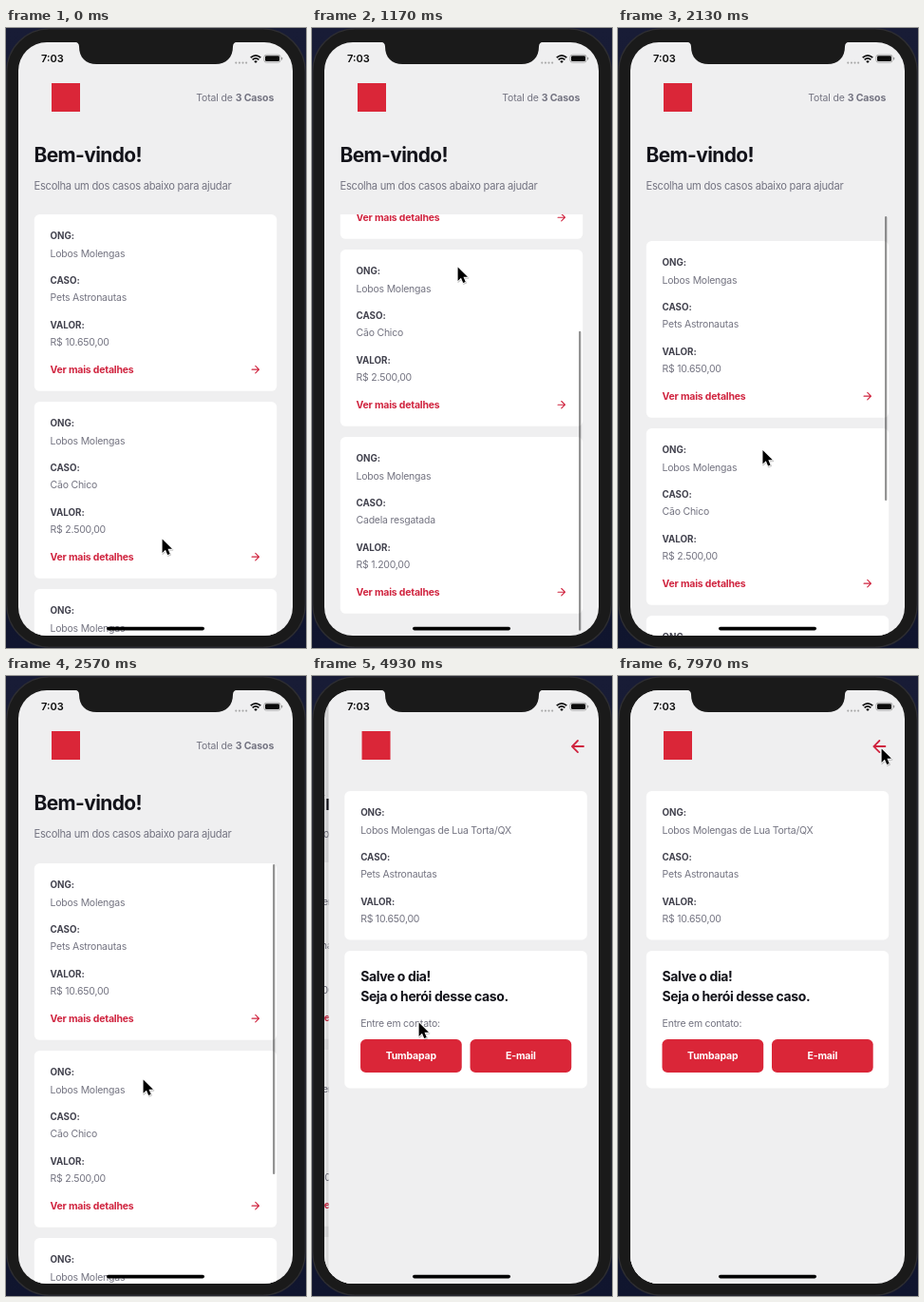
Write an HTML page that moves like this. It is 316 px wide and 652 px high and loops after 8 s.

```html
<!DOCTYPE html>
<html lang="pt-BR">
<head>
<meta charset="utf-8">
<title>Casos</title>
<style>
  html, body { margin: 0; width: 100%; height: 100%; overflow: hidden; background: #12162c; }
  svg { display: block; width: 100vw; height: 100vh; }
  text { font: 400 10.47px Inter, "Open Sans", sans-serif; letter-spacing: -.021em; fill: #737380; }
  .label { font-size: 9.77px; font-weight: 700; letter-spacing: -.004em; fill: #41414d; }
  .link { font-weight: 700; letter-spacing: -.019em; fill: #d0243f; }
  .title { font-size: 20.9px; font-weight: 700; letter-spacing: -.028em; fill: #13131a; }
  .hero { font-size: 13.96px; font-weight: 700; letter-spacing: -.026em; fill: #13131a; }
  .intro { font-size: 11.17px; letter-spacing: -.024em; }
  .button { font-weight: 700; letter-spacing: -.013em; fill: #fff; text-anchor: middle; }
  .clock { font-size: 11px; font-weight: 600; letter-spacing: 0; fill: #0b0b0b; }
  .total { letter-spacing: -.01em; text-anchor: end; }
  .bold { font-weight: 700; }
  .line { fill: none; stroke: #d0243f; stroke-width: 2.1; stroke-linecap: round; stroke-linejoin: round; }
</style>
</head>
<body>
<svg id="stage" viewBox="0 0 316 652"></svg>
<script>
const LOOP = 8000;
const SCREEN = { x: 13, y: 15, w: 289, h: 624 };
const LIST_TOP = 196, CARD_STEP = 197, MAX_SCROLL = 148;
const PUSH_START = 4596;
const RED = '#da2638', PAPER = '#efeff0', BODY = '#1a1a1a', INK = '#0b0b0b';

const ong = 'Lobos Molengas';
const cases = [
  ['Pets Astronautas', 'R$ 10.650,00'],
  ['Cão Chico', 'R$ 2.500,00'],
  ['Cadela resgatada', 'R$ 1.200,00'],
];

const text = (x, y, str, cls = '') => `<text x="${x}" y="${y}" class="${cls}">${str}</text>`;
const rect = (x, y, w, h, fill, r = 0, more = '') =>
  `<rect x="${x}" y="${y}" width="${w}" height="${h}" rx="${r}" fill="${fill}" ${more}/>`;
const card = (y, h) => rect(29.8, y, 255.4, h, '#fff', 5.6);
const logo = rect(48, 58, 30, 30, RED);

const fields = (y, values) => ['ONG:', 'CASO:', 'VALOR:'].map((name, i) =>
  text(46.6, y + 26.4 + i * 46.7, name, 'label') +
  text(46.6, y + 44.6 + i * 46.7, values[i])).join('');

const caseCard = ([name, value], i) => {
  const y = LIST_TOP + i * CARD_STEP;
  return card(y, 185.8) + fields(y, [ong, name, value]) +
    `<g id="link${i}">${text(46.6, y + 166.8, 'Ver mais detalhes', 'link')}
      <path class="line" transform="translate(256.4 ${y + 156.8}) scale(.53)" d="M5 12h14M12 5l7 7-7 7"/></g>`;
};

const listScreen = `
  ${rect(13, 15, 289, 624, PAPER)}${logo}
  ${text(282.2, 77, 'Total de <tspan class="bold">3 Casos</tspan>', 'total')}
  ${text(29.5, 141, 'Bem-vindo!', 'title')}
  ${text(29.5, 169.8, 'Escolha um dos casos abaixo para ajudar', 'intro')}
  <g clip-path="url(#viewport)">
    <g id="cards">${cases.map(caseCard).join('')}</g>
    ${rect(281, 198, 2.3, 327, '#000', 1.1, 'id="bar"')}
  </g>`;

const button = (x, label) =>
  rect(x, 382, 106.7, 35, RED, 5.6) + text(x + 53.3, 403.2, label, 'button');

const detailScreen = `
  ${rect(8, 15, 5, 624, 'url(#shade)')}
  ${rect(13, 15, 289, 624, PAPER)}${logo}
  <path class="line" transform="translate(265.1 63.7) scale(.86)" d="M19 12H5M12 19l-7-7 7-7"/>
  ${card(121, 156.5)}${fields(121, [ong + ' de Lua Torta/QX', ...cases[0]])}
  ${card(289, 144.5)}
  ${text(46.6, 321, 'Salve o dia!', 'hero')}
  ${text(46.6, 342, 'Seja o herói desse caso.', 'hero')}
  ${text(46.6, 368.8, 'Entre em contato:')}
  ${button(46.5, 'Tumbapap')}${button(162, 'E-mail')}`;

const statusBar = `
  ${text(37, 36, '7:03', 'clock')}
  ${[0, 1, 2, 3].map(i => `<circle cx="${242.3 + i * 3.6}" cy="36.6" r="1.1" fill="#aaa"/>`).join('')}
  <g fill="none" stroke="${INK}" stroke-width="1.7">
    <path d="M257.7 31.2q5.3-4.8 10.6 0M259.6 33.4q3.4-3 6.8 0"/>
    <path d="M263 36.9l-1.8-1.9q1.8-1.4 3.6 0z" fill="${INK}" stroke="none"/>
  </g>
  ${rect(271.9, 28.2, 17.2, 8, 'none', 2.4, 'stroke="#999" stroke-width=".8"')}
  ${rect(273, 29.3, 15, 5.8, INK, 1.4)}
  ${rect(290, 30.8, 1.2, 2.8, '#999', .5)}`;

document.getElementById('stage').innerHTML = `
  <defs>
    <clipPath id="screen">${rect(SCREEN.x, SCREEN.y, SCREEN.w, SCREEN.h, '#000', 30)}</clipPath>
    <clipPath id="viewport">${rect(13, LIST_TOP, 289, 443, '#000')}</clipPath>
    <linearGradient id="shade">
      <stop offset="0" stop-opacity="0"/><stop offset="1" stop-opacity=".1"/>
    </linearGradient>
    <linearGradient id="desk" x2="0" y2="1">
      <stop offset="0" stop-color="#181c36"/><stop offset="1" stop-color="#10152e"/>
    </linearGradient>
  </defs>
  ${rect(0, 0, 316, 652, 'url(#desk)')}
  ${rect(.8, .8, 314.4, 650.4, BODY, 45, 'stroke="#2e2e32" stroke-width="1.2"')}
  <g clip-path="url(#screen)">
    <g id="list">${listScreen}</g>
    ${rect(13, 15, 289, 624, '#000', 0, 'id="dim"')}
    <g id="detail">${detailScreen}</g>
    ${statusBar}
    ${rect(106, 629.8, 103, 3.6, '#000', 1.8)}
  </g>
  <path fill="${BODY}" d="M72 14.5Q77 15 77 19.5C77 31 84 38 95.5 38H220.5C232 38 239 31 239 19.5Q239 15 244 14.5z"/>
  <g id="cursor" stroke-linejoin="round">
    <path d="M0 0V17l4-3.7 2.7 6.2 3-1.3-2.7-6h5.4z" transform="translate(.6 1.2)" opacity=".22" stroke="#000" stroke-width="2"/>
    <path d="M0 0V17l4-3.7 2.7 6.2 3-1.3-2.7-6h5.4z" stroke="#fff" stroke-width="1.9" paint-order="stroke"/>
  </g>`;

const el = id => document.getElementById(id);
const [list, dim, detail, cards, bar, cursor, link] =
  ['list', 'dim', 'detail', 'cards', 'bar', 'cursor', 'link0'].map(el);

const clamp = (v, lo = 0, hi = 1) => Math.min(hi, Math.max(lo, v));
const ramp = (t, a, b) => clamp((t - a) / (b - a));

// Monotone cubic through keys [time, value, ...]; flat at turning points.
function curve(keys, t, col = 1) {
  const last = keys.length - 1;
  if (t <= keys[0][0]) return keys[0][col];
  if (t >= keys[last][0]) return keys[last][col];
  const slope = i => (keys[i + 1][col] - keys[i][col]) / (keys[i + 1][0] - keys[i][0]);
  const tangent = i => {
    if (i === 0 || i === last) return 0;
    const a = slope(i - 1), b = slope(i);
    return a * b <= 0 ? 0 : 2 * a * b / (a + b);
  };
  const i = keys.findIndex(k => k[0] > t) - 1;
  const h = keys[i + 1][0] - keys[i][0], u = (t - keys[i][0]) / h, v = 1 - u;
  return keys[i][col] * v * v * (1 + 2 * u) + keys[i + 1][col] * u * u * (3 - 2 * u) +
    h * u * v * (tangent(i) * v - tangent(i + 1) * u);
}

const scrollKeys = [
  [80, 0], [350, 110], [600, 190], [850, 184], [1170, 160], [1420, 148], [1500, 148],
  [1770, 51], [1960, -22], [2130, -28], [2350, -8], [2570, -1], [2750, 0],
];
const pointerKeys = [
  [70, 164, 536], [350, 160, 410], [600, 154, 262], [750, 153, 250], [1450, 153, 250],
  [1770, 158, 381], [1980, 156, 446], [2200, 150, 440], [2570, 144, 423],
  [3000, 118, 372], [3300, 110, 357], [3430, 110, 357], [3600, 112, 363], [5430, 112, 363],
  [5790, 246, 400], [6110, 50, 402], [6240, 75, 403], [6600, 75, 403],
  [7130, 276, 182], [7450, 290, 112], [7950, 277, 75],
];

// Critically damped spring: share of the way still to go.
function springLeft(ms) {
  if (ms <= 0) return 1;
  const wt = Math.sqrt(1000 / 3) * ms / 1000;
  return Math.exp(-wt) * (1 + wt);
}

function draw(t) {
  const scroll = curve(scrollKeys, t);
  const inside = clamp(scroll, 0, MAX_SCROLL), over = scroll - inside;
  cards.setAttribute('transform', `translate(0 ${-scroll})`);
  bar.setAttribute('y', 198 + inside * .735 + Math.max(0, over));
  bar.setAttribute('height', 327 - Math.abs(over));
  bar.setAttribute('opacity', .42 * ramp(t, 80, 220) * (1 - ramp(t, 2850, 3150)));

  link.setAttribute('opacity', 1 - .8 * ramp(t, 4410, 4530) * (1 - ramp(t, 4570, 4800)));

  const left = springLeft(t - PUSH_START);
  list.setAttribute('transform', `translate(${-.3 * SCREEN.w * (1 - left)} 0)`);
  dim.setAttribute('opacity', .07 * (1 - left));
  detail.setAttribute('transform', `translate(${SCREEN.w * left} 0)`);
  detail.setAttribute('visibility', left < 1 ? 'visible' : 'hidden');

  const x = curve(pointerKeys, t) + .6, y = curve(pointerKeys, t, 2) + 1.6;
  cursor.setAttribute('transform', `translate(${x} ${y}) scale(.84)`);
}

const start = performance.now();
function tick() {
  draw((performance.now() - start) % LOOP);
  requestAnimationFrame(tick);
}
tick();
</script>
</body>
</html>
```
